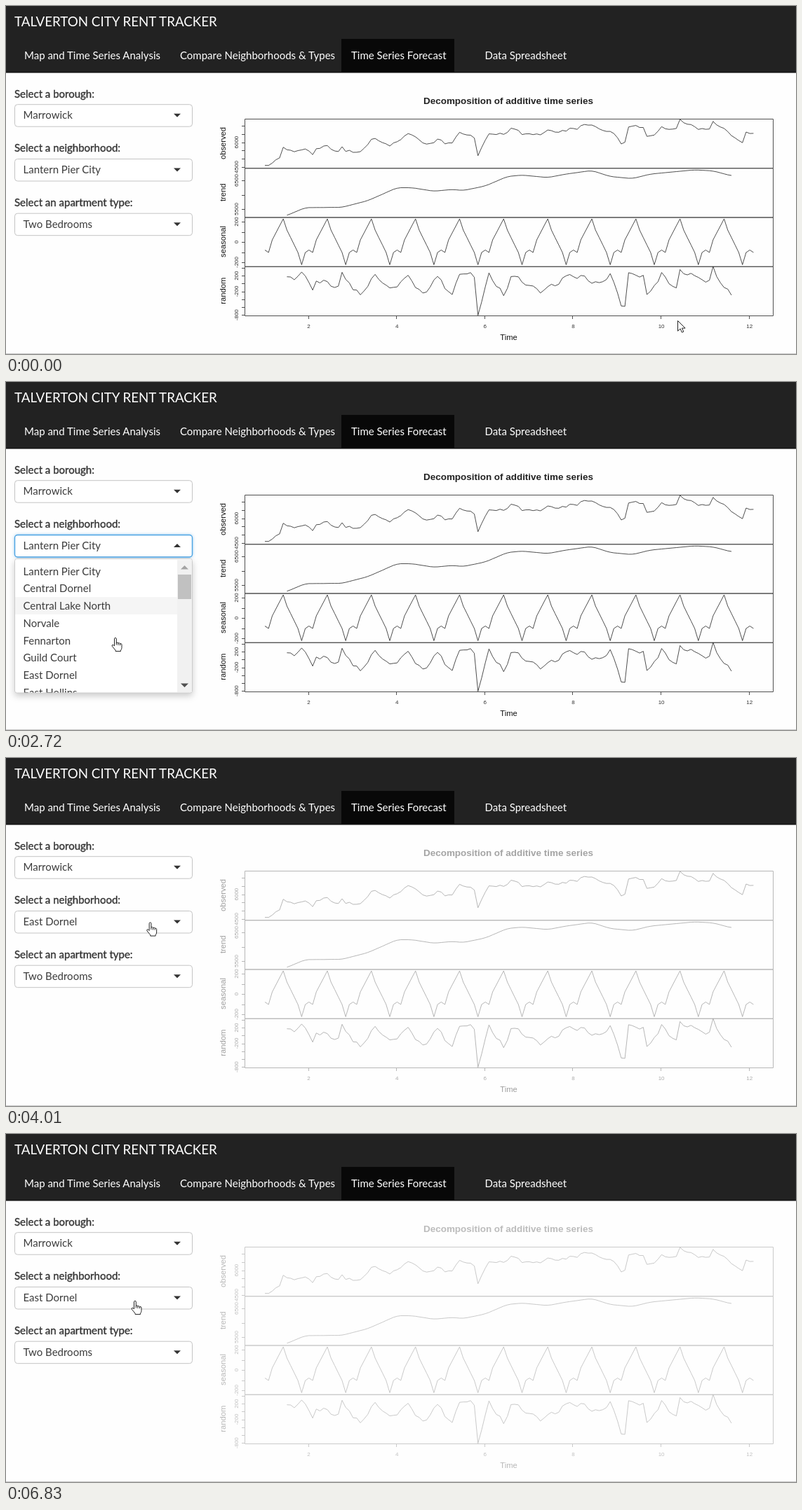
Animation of 1126x497 px, one loop 8 s. Source, as an HTML page:

```html
<!DOCTYPE html>
<html lang="en">
<head>
<meta charset="utf-8">
<title>Rent dashboard</title>
<style>
  html, body { margin: 0; width: 100%; height: 100%; overflow: hidden; background: #fefefe; }
  svg { display: block; }
  text { font: 15px Lato, "Open Sans", sans-serif; fill: #3c3c3c; white-space: pre; }
  .nav text { fill: #fff; }
  .nav .brand { font-size: 18.75px; }
  .label { fill: #333; stroke: #333; stroke-width: .35px; }
  .box { fill: #fff; stroke: #c4c4c4; }
  .box.focus { stroke: #4ba3e3; stroke-width: 1.4px; filter: drop-shadow(0 0 2px rgba(75,163,227,.5)); }
  #menu { filter: drop-shadow(0 4px 5px rgba(0,0,0,.2)); }
  #chart text { font: 11.2px "Liberation Sans", Arial, sans-serif; fill: #111; text-anchor: middle; }
  #chart .head { font-weight: bold; font-size: 13.44px; fill: #222; }
  #chart .tick { font-size: 8px; fill: #333; }
  #chart path { fill: none; stroke: #222; stroke-width: .8px; stroke-linejoin: round; }
  #chart .frame { stroke: #505050; stroke-width: 1px; }
  .pointer { fill: #fff; stroke: #222; stroke-linejoin: round; }
</style>
</head>
<body>
<svg id="stage" width="1126" height="497" viewBox="0 0 1126 497"></svg>
<script>
const LOOP = 8000, OPEN = 1980, CLOSE = 3320, STEP = 70;
const places = ["Lantern Pier City", "Central Dornel", "Central Lake North", "Norvale",
  "Fennarton", "Guild Court", "East Dornel", "East Hollins"];
const ROW = 24.75, ROW_TOP = 257.6;

const text = (x, y, s, attrs = "") => `<text x="${x}" y="${y}" ${attrs}>${s}</text>`;
const rect = (x, y, w, h, attrs) => `<rect x="${x}" y="${y}" width="${w}" height="${h}" ${attrs}/>`;
const upright = (x, y, s, cls = "") =>
  text(0, 0, s, `class="${cls}" transform="translate(${x} ${y}) rotate(-90)"`);

// ---- Chart: observed = trend + seasonal + random, key points are [month, y] ----
const trendKeys = [[0,309],[6,299],[11,288],[21,287.5],[28,278],[36,259.5],[40,259.5],[46,264.5],[51,262],
  [54,263.5],[60,257],[66,243.5],[70,241.5],[77,245],[82,240],[89,235],[94,243.5],[100,246.5],[105,240],
  [117,234],[122,235.5],[127,242.5]];
const seasonKeys = [[0,348.5],[1,352],[2,334],[5,304],[6,320],[9,352],[10,369.5],[11,352]];
const noiseKeys = [[0,415],[4,412],[5,380],[8,394],[10,376],[13,408],[14,390],[20,401],[21,383],[26,414],
  [30,384],[34,405],[39,386],[43,412],[47,387],[51,414],[53,382],[57,384],[58,440],[61,382],[65,414],
  [67,385],[75,407],[84,383],[91,398],[94,382],[97,428],[98,428],[99,382],[103,386],[104,413],[108,383],
  [112,405],[113,378],[121,395],[122,375],[125,404],[130,422],[131,395]];

function along(keys, i) {
  const k = keys.findIndex(p => p[0] > i);
  if (k < 1) return keys.at(k)[1];
  const [a, ya] = keys[k - 1], [b, yb] = keys[k];
  return ya + (yb - ya) * (i - a) / (b - a);
}
const jitter = i => (Math.sin(i * 127.1) * 43758.5 % 1) * 4;

const trendY = i => (along(trendKeys, i - 1) + along(trendKeys, i) + along(trendKeys, i + 1)) / 3;
const seasonY = i => along(seasonKeys, i % 12);
const noiseY = i => along(noiseKeys, i) + jitter(i);
function observedY(i) {
  const value = 6500 - (trendY(i) - 249) * 24.4 - (seasonY(i) - 337) * 6.9 - (noiseY(i) - 396) * 17.86;
  return 195 - (value - 6000) / 42;
}
function series(from, to, y) {
  let d = "";
  for (let i = from; i <= to; i++) d += `${d ? "L" : "M"}${(369 + i * 5.236).toFixed(1)} ${y(i).toFixed(1)}`;
  return `<path d="${d}"/>`;
}
// Ticks run from y0 in equal steps; labels map a tick index to its text.
function axis(y0, step, count, labels) {
  let out = "";
  for (let k = 0; k < count; k++) {
    const y = y0 + k * step;
    out += `<path class="frame" d="M336 ${Math.round(y) + .5}h4"/>`;
    if (k in labels) out += upright(330.5, y, labels[k], "tick");
  }
  return out;
}
function chart() {
  let out = text(716, 140, "Decomposition of additive time series", 'class="head"') + text(716.5, 477, "Time");
  ["observed", "trend", "seasonal", "random"].forEach((s, k) => {
    const y = 161.5 + k * 70.25;
    out += upright(312.5, y + 34.5, s) + `<path class="frame" d="M340.5 ${y}h753v70.25h-753z"/>`;
  });
  out += axis(171, 11.8, 6, { 2: "6000", 5: "4500" });
  out += axis(249, 20.5, 3, { 0: "6500", 2: "5500" });
  out += axis(308, 14.5, 5, { 0: "200", 2: "0", 4: "-200" });
  out += axis(374, 11.2, 7, { 1: "200", 3: "-200", 6: "-800" });
  for (let n = 2; n <= 12; n += 2) {
    const x = 432 + (n - 2) * 62.83;
    out += `<path class="frame" d="M${Math.floor(x) - .5} 443v4"/>` + text(x - .5, 460, n, 'class="tick"');
  }
  return out + series(0, 133, observedY) + series(6, 127, trendY) + series(0, 133, seasonY) + series(6, 127, noiseY);
}

// ---- Page ----
const field = (y, label, value, id) => text(12, y + 5.3, label, 'class="label"')
  + rect(12.5, y + 15.5, 253, 31.5, `rx="4" class="box" id="${id}Box"`)
  + text(24.5, y + 36, value, `id="${id}"`)
  + `<path id="${id}Mark" d="M239 ${y + 28.5}h10l-5 5z" fill="#333"/>`;

const menu = `<clipPath id="clip">${rect(12, 252, 254, 191.5, "")}</clipPath>
  <g id="menu">${rect(12.5, 252.5, 253, 191.5, 'rx="3" fill="#fff" stroke="#ccc"')}
  <g clip-path="url(#clip)">${rect(13, 0, 231, ROW, 'id="hover" fill="#f5f5f5"')}
  ${places.map((s, i) => text(24.5, 275.5 + i * ROW, s)).join("")}</g>
  ${rect(244, 254, 21, 189, 'fill="#f1f1f1"')}${rect(245, 275, 19, 35, 'fill="#c1c1c1"')}
  <path d="M249 267.5h11l-5.5-5.5z" fill="#a3a3a3"/><path d="M249 430.5h11l-5.5 5.5z" fill="#505050"/></g>`;

const $ = id => document.getElementById(id);

$("stage").innerHTML = `${rect(0, 0, 1126, 497, 'fill="#fefefe"')}
  <g class="nav">${rect(0, 0, 1126, 95, 'fill="#222"')}${rect(0, 94, 1126, 1.5, 'fill="#111"')}
  ${rect(478, 47, 161, 47, 'fill="#080808"')}
  ${text(12, 29, "TALVERTON CITY RENT TRACKER", 'class="brand"')}
  ${text(26, 76, "Map and Time Series Analysis")}${text(248, 76, "Compare Neighborhoods &amp; Types")}
  ${text(492, 76, "Time Series Forecast")}${text(682.5, 76, "Data Spreadsheet")}</g>
  <g id="chart">${chart()}</g>
  ${field(125.2, "Select a borough:", "Marrowick", "borough")}
  ${field(203, "Select a neighborhood:", places[0], "place")}
  ${field(280.7, "Select an apartment type:", "Two Bedrooms", "type")}
  <path id="placeUp" d="M239 236h10l-5-5z" fill="#333"/>
  <path id="caret" d="M0 226v17" stroke="#222" stroke-width="1.2"/>
  ${menu}
  ${rect(0, 496, 1126, 1, 'fill="#c9c9c9"')}
  <circle id="click" r="11.5" fill="#fbf26c"/>
  <g id="arrow" class="pointer"><path d="M.5.5V15.2l3.6-3.3 2.3 5.2 2.4-1-2.3-5h4.6z"/></g>
  <g id="hand" class="pointer"><path d="M-1 12V1.8Q-1 .4.4.4T1.8 1.8V7.2Q4 6.6 4.4 7.9Q6.8 7.3 7 8.6Q9.4 8.2 9.5 10V14.5Q9.5 16.5 8 18.2V19.6H.6V18.2L-4.2 12.3Q-5 10.7-3.4 10.3Q-2.2 10.4-1 12Z"/>
  <path d="M1.8 7v3.5M4.4 8v3M7 8.8v2.4" fill="none"/></g>`;

const show = (id, on) => $(id).style.display = on ? "" : "none";
const moveTo = (id, x, y) => $(id).setAttribute("transform", `translate(${x} ${y})`);

// Pointer moves: first step, last step, target x, y, forced shape
const moves = [[70, 70, 861, 367], [440, 720, 279, 276], [1110, 1650, 175.5, 229],
  [2440, 2720, 155.5, 365, "hand"], [2790, 3140, 149, 421, "arrow"],
  [3590, 3870, 213.5, 233.5], [3940, 4350, 188.5, 236.5],
  [6310, 6370, 187.5, 237.5], [6680, 6830, 183.5, 238]];

function pointerAt(t) {
  let x = 957, y = 449, shape;
  for (const [a, b, tx, ty, forced] of moves) {
    if (t < a) break;
    const steps = span => Math.floor(span / STEP) + 1;
    const done = Math.min(1, steps(t - a) / steps(b - a));
    x += (tx - x) * done;
    y += (ty - y) * done;
    shape = forced;
  }
  const overField = x > 12 && x < 266 && (y > 218 && y < 251 || y > 296 && y < 328);
  return { x, y, shape: shape || (overField ? "hand" : "arrow") };
}

const caretX = 25.5 + $("place").getComputedTextLength();

function draw(t) {
  const open = t >= OPEN && t < CLOSE;
  const p = pointerAt(t);
  for (const id of ["arrow", "hand"]) {
    show(id, p.shape === id);
    moveTo(id, p.x, p.y);
  }
  show("click", t >= 1850 && t < 1980 || t >= 3250 && t < 3380);
  moveTo("click", p.x, p.y + .5);

  show("menu", open);
  show("placeUp", open);
  show("placeMark", !open);
  $("placeBox").setAttribute("class", open ? "box focus" : "box");
  $("place").textContent = places[t < CLOSE ? 0 : 6];
  show("caret", open && (t - OPEN) % 1060 < 530);
  moveTo("caret", caretX, 0);

  // The hovered row trails the pointer slightly.
  const row = Math.max(0, Math.floor((pointerAt(t - 2 * STEP).y - ROW_TOP) / ROW));
  $("hover").setAttribute("y", ROW_TOP + row * ROW);

  const f = Math.min(1, Math.max(0, (t - 3800) / 280));
  $("chart").setAttribute("opacity", 1 - .7 * f * f * (3 - 2 * f));
}

const start = performance.now();
function tick() {
  draw((performance.now() - start) % LOOP);
  requestAnimationFrame(tick);
}
tick();
</script>
</body>
</html>
```
